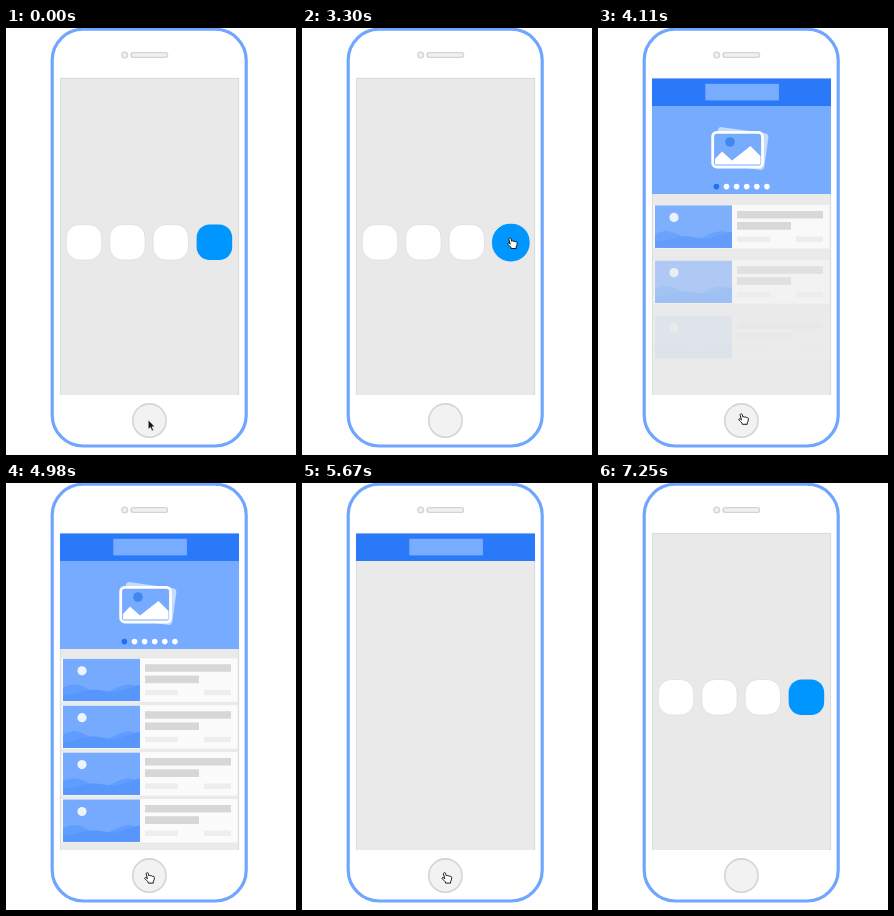
An HTML page that plays this animation: 290x427 px, repeating every 7.75 s.

```html
<!DOCTYPE html>
<html lang="en">
<head>
<meta charset="utf-8">
<title>App launch</title>
<style>
  html, body { margin: 0; width: 100%; height: 100%; overflow: hidden; background: #fefefe; }
  svg { display: block; width: 290px; height: 427px; }
</style>
</head>
<body>
<svg viewBox="0 0 290 427">
  <defs>
    <clipPath id="screen"><rect x="54" y="50" width="179" height="317"/></clipPath>
    <g id="row">
      <rect x="55.5" y="-.5" width="176" height="43.5" fill="#fbfbfb"/>
      <rect x="57" width="77" height="42.3" fill="#75aaff"/>
      <path d="M57 29C66 24 72 25 80 29S94 36 104 32S122 22 134 29V42.3H57Z" fill="#5f9dff"/>
      <path d="M57 36C70 36 78 30 90 31S106 35 114 32S128 28 134 26V42.3H57Z" fill="#5797fd"/>
      <circle cx="76" cy="12" r="4.6" fill="#eef3fc"/>
      <path d="M139 5.5h86v7.5h-86zM139 16.7h54v7.7h-54z" fill="#d7d7d7"/>
      <path d="M139 31h33v5.5h-33zM198 31h27v5.5h-27z" fill="#eee"/>
    </g>
  </defs>

  <rect x="46.2" y="1.2" width="194" height="416.8" rx="31" fill="#fff" stroke="#70a6ff" stroke-width="3.2"/>
  <g fill="#f0f0f0" stroke="#d4d4d4" stroke-width="1.4">
    <circle cx="118.7" cy="27" r="2.9"/>
    <rect x="125" y="24.6" width="36.6" height="4.8" rx="2.4"/>
    <circle cx="143.4" cy="392.6" r="16.7" fill="#f2f2f2" stroke-width="1.6"/>
  </g>

  <rect x="54" y="50" width="179" height="317" fill="#e9e9e9"/>
  <path d="M54.4 367V50.4H232.6V367" fill="none" stroke="#d9d9d9" stroke-width=".9"/>
  <g id="icons" fill="#fff" stroke="#dedede" stroke-width=".8"></g>

  <g clip-path="url(#screen)">
    <rect id="app" fill="#0096ff"/>
    <g id="page">
      <rect x="54" y="50" width="179" height="317" fill="#eaeaea"/>
      <path d="M54.4 367V78M232.6 367V78" stroke="#dadada" stroke-width=".9"/>
      <g id="banner">
        <rect x="54" y="77" width="179" height="89" fill="#76abff"/>
        <rect x="117.5" y="102" width="51" height="37" rx="4" fill="#c6dbff" transform="rotate(8 143 121)"/>
        <rect x="114.7" y="104.4" width="49.8" height="34.6" rx="4" fill="#76abff" stroke="#fff" stroke-width="2.8"/>
        <path d="M117 131L124 123.5L134 132.5L152.5 118L162.5 128V136.5H117Z" fill="#fff"/>
        <circle cx="132" cy="114" r="4.8" fill="#3e87f2"/>
        <g id="dots"></g>
      </g>
      <rect x="54" y="50.5" width="179" height="27.5" fill="#2979f8"/>
      <rect x="107.3" y="55.8" width="73.6" height="16.6" fill="#78acff"/>
      <g id="rows"></g>
    </g>
  </g>

  <g id="cursor" stroke-linejoin="round" stroke-linecap="round">
    <path id="arrow" d="M0 0V9.3L2.2 7.4L3.8 11L5.4 10.3L3.8 6.8H6.6Z" fill="#151515" stroke="#fff" stroke-width=".6"/>
    <path id="hand" d="M-1.6 1.2C-1.6 0 .4-.1 .6 1.2L1.2 3.6C1.8 2.9 2.9 3 3.1 3.8C3.8 3.2 4.8 3.5 4.9 4.2C5.8 3.8 6.8 4.3 6.7 5.2C6.7 7 6.3 8.3 5.6 9.3V10.8H.6L.4 9.6C-.8 8.6-1.8 7.2-2.8 6.4C-3.4 5.5-2.3 4.8-1.4 5.5L-.5 6.2Z" fill="#fff" stroke="#111" stroke-width=".95"/>
  </g>
</svg>

<script>
const LOOP = 7750, ROWS = 4;
const $ = id => document.getElementById(id);

function add(parent, tag, attrs) {
  const el = document.createElementNS("http://www.w3.org/2000/svg", tag);
  set(el, attrs);
  return parent.appendChild(el);
}
function set(el, attrs) {
  for (const key in attrs) el.setAttribute(key, attrs[key]);
}

for (let i = 0; i < 4; i++)
  add($("icons"), "rect", { x: 60.3 + i * 43.4, y: 196.5, width: 35.4, height: 35.5, rx: 13 });
for (let i = 0; i < 6; i++)
  add($("dots"), "circle", { cx: 118.4 + i * 10.1, cy: 158.6, r: 2.8, fill: i ? "#fff" : "#1d70ee" });
const rows = Array.from({ length: ROWS }, () => add($("rows"), "use", { href: "#row" }));

const unit = (t, from, to) => Math.min(1, Math.max(0, (t - from) / (to - from)));
const smooth = p => p * p * (3 - 2 * p);
const cubic = p => p < .5 ? 4 * p ** 3 : 1 - 4 * (1 - p) ** 3;

// Rises over [a, b] and falls again over [c, d].
const pulse = (t, a, b, c, d, ease = smooth) => ease(unit(t, a, b)) - ease(unit(t, c, d));

// Pointer hotspot: time, x, y
const PATH = [
  [0, 142.2, 392], [119, 142.2, 392], [120, 142, 391.5], [209, 142, 391.5], [210, 142, 391],
  [1800, 142, 391], [2280, 223, 208], [2520, 208.5, 210.5], [2700, 208.5, 210.5],
  [2760, 208.5, 209.7], [3420, 208.5, 209.7], [4050, 144, 382], [4110, 143.7, 385.5],
  [4300, 141.7, 389], [4980, 141.7, 389.3], [5670, 143, 389.3], [5850, 143.7, 389.3],
  [6240, 145.5, 389.6], [6520, 145.5, 389.6], [7250, 223, 430], [LOOP, 223, 430]
];

function pointer(t) {
  const i = PATH.findIndex(p => p[0] > t);
  const [t0, x0, y0] = PATH[i - 1], [t1, x1, y1] = PATH[i];
  const p = smooth(unit(t, t0, t1));
  return [x0 + (x1 - x0) * p, y0 + (y1 - y0) * p];
}

function drawApp(t) {
  const grow = pulse(t, 3253, 3690, 5850, 6240, cubic);
  const r = 17.75 + 213 * grow;
  set($("app"), {
    x: 208.4 + Math.min(.5, grow * 80) - r, y: 214.2 + Math.min(.4, grow * 60) - r,
    width: 2 * r, height: 2 * r, rx: Math.min(r, 13 + grow * 1000)
  });
}

function drawPage(t) {
  $("page").style.opacity = pulse(t, 3690, 3840, 5680, 5840);
  $("banner").style.opacity = pulse(t, 3840, 4130, 5380, 5640);
  rows.forEach((row, i) => {
    const enter = 3780 + i * 130, leave = 4985 + (ROWS - 1 - i) * 85;
    const shown = pulse(t, enter, enter + 400, leave, leave + 320);
    set(row, { y: 175.8 + i * 46.9 + 20 * (1 - shown), opacity: shown });
  });
}

function drawCursor(t) {
  const [x, y] = pointer(t);
  const onHome = t >= 1100 && Math.hypot(x - 143.4, y - 392.6) < 17.5;
  const onApp = t < 3690 && x > 191 && x < 227 && y > 196 && y < 232;
  const hand = onHome || onApp;
  set($("cursor"), { transform: `translate(${x} ${y})` });
  $("hand").style.display = hand ? "" : "none";
  $("arrow").style.display = hand ? "none" : "";
}

function render(t) {
  drawApp(t);
  drawPage(t);
  drawCursor(t);
}

const start = performance.now();
function tick() {
  render((performance.now() - start) % LOOP);
  requestAnimationFrame(tick);
}
tick();
</script>
</body>
</html>
```
